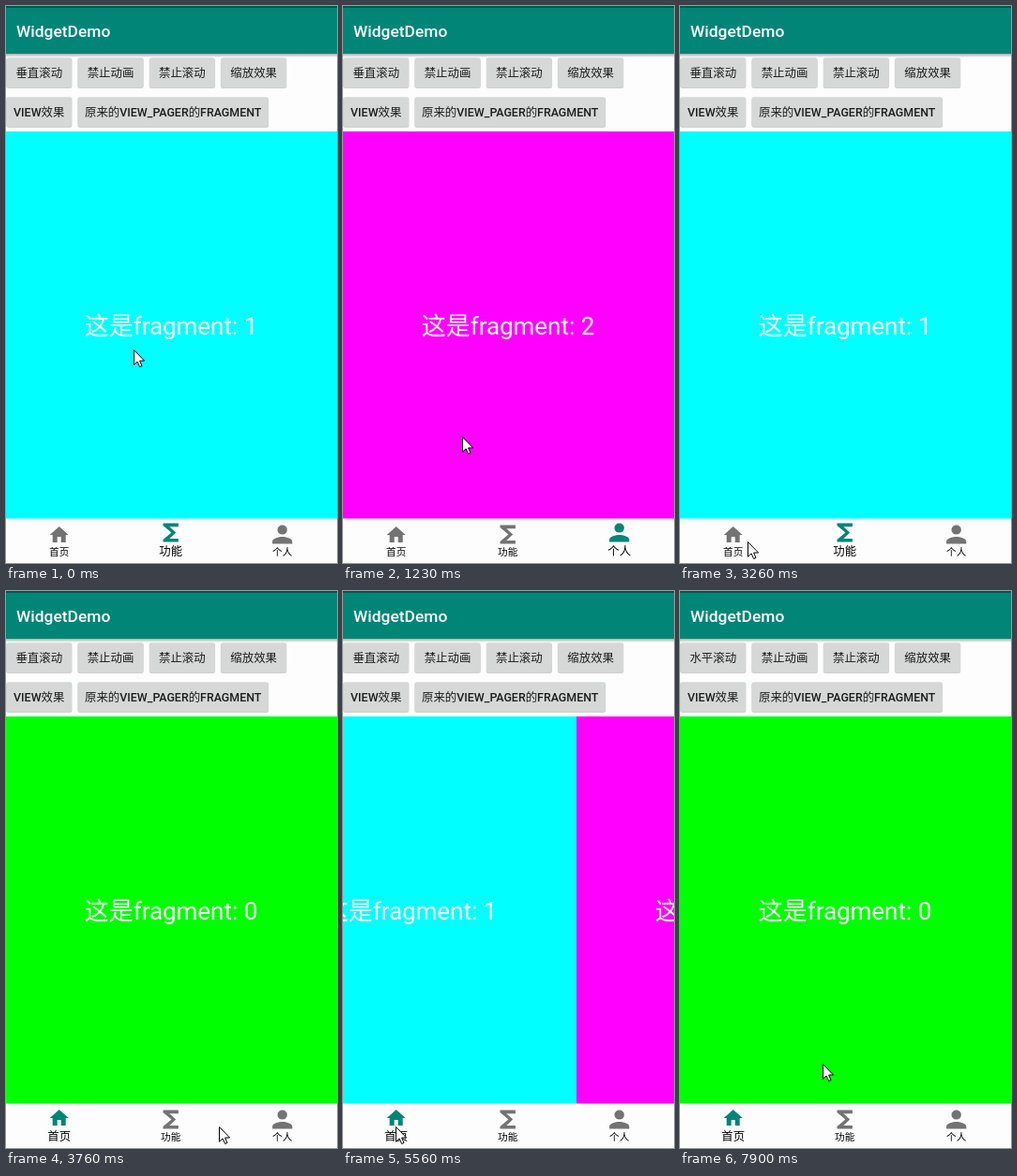
These frames come from a looping animation (353x595 px, 8 s). An HTML page:

```html
<!DOCTYPE html>
<html lang="zh-CN">
<head>
<meta charset="utf-8">
<title>WidgetDemo</title>
<style>
  html, body { margin: 0; width: 100%; height: 100%; overflow: hidden; background: #fdfdfd; }
  svg { display: block; width: 353px; height: 595px; }
  text { font-family: Roboto, "Noto Sans CJK SC", "Noto Sans CJK", sans-serif; }
  .mid { text-anchor: middle; }
  .btn { font-size: 12.43px; font-weight: 500; fill: #1c1c1c; }
  .page { font-size: 25.95px; fill: #fff; }
</style>
</head>
<body>
<svg id="stage" viewBox="0 0 353 595" xmlns="http://www.w3.org/2000/svg">
  <defs>
    <linearGradient id="shade" x2="0" y2="1">
      <stop offset="0" stop-color="#000" stop-opacity=".32"/>
      <stop offset="1" stop-color="#000" stop-opacity="0"/>
    </linearGradient>
  </defs>
  <rect width="353" height="595" fill="#fdfdfd"/>
  <rect y="51" width="353" height="4" fill="url(#shade)"/>
  <rect width="353" height="51" fill="#008577"/>
  <rect width="353" height="2" fill="#00574b"/>
  <text x="11" y="33" font-size="17.4" font-weight="500" fill="#fff">WidgetDemo</text>
  <g id="buttons"></g>
  <g id="pages"></g>
  <rect y="547.5" width="353" height="47.5" fill="#fdfdfd"/>
  <g id="tabs"></g>
  <path id="cursor" d="M.5 .5V16.3L4.1 12.9 6.6 18.5 9 17.5 6.6 12H11.6Z" fill="#fff" stroke="#000" stroke-linejoin="round"/>
</svg>
<script>
const LOOP = 8000, W = 353, TAB_LEAD = 38;
const $ = id => document.getElementById(id);

function add(parent, tag, attrs, text) {
  const el = document.createElementNS('http://www.w3.org/2000/svg', tag);
  for (const k in attrs) el.setAttribute(k, attrs[k]);
  if (text) el.textContent = text;
  parent.appendChild(el);
  return el;
}

// The screen refreshes in bursts: start, interval (ms), count
const bursts = [
  [0, 150, 1], [150, 133, 7], [1230, 140, 7], [2340, 130, 7], [3400, 120, 6],
  [4330, 133, 7], [5560, 144, 6], [6560, 134, 6], [7630, 135, 3]
];

// Pointer legs: start, end (ms), then the place reached
const home = [136, 367];
const legs = [
  [0, 410, 262, 366],
  [410, 810, 116, 356],
  [1100, 1230, 127, 460],
  [1230, 2070, 174, 572],
  [2600, 3200, 56, 572],
  [3400, 3890, 289, 572],
  [4870, 5160, 56, 572],
  [5700, 6280, 175, 4],
  [6560, 7230, 42, 76],
  [7630, 7900, 152, 505]
];

// Page scrolls: start (ms), from, to
const scrolls = [[700, 1.33, 2], [2378, 2, 1], [3370, 1, 0], [4620, 0, 2], [5535, 2, 0]];
const DRAG = { start: 410, x: 262 };
const CLICK = 7630, RELEASE = 7765;

const lastBefore = (list, t) => list.filter(k => k[0] <= t).pop();
const progress = (t, start, length) => Math.max(0, Math.min(1, (t - start) / length));

function refresh(t) {
  const [start, step, count] = lastBefore(bursts, t);
  return start + step * Math.min(count - 1, Math.floor((t - start) / step));
}

function pointer(t) {
  let [x, y] = home;
  for (const [start, end, toX, toY] of legs) {
    const u = progress(t, start, end - start);
    x += (toX - x) * u;
    y += (toY - y) * u;
  }
  return [x, y];
}

// Each page adds 100 ms; the scroll decelerates by a fifth power.
function scrollPos(t, x) {
  const s = lastBefore(scrolls, t);
  if (!s) return t > DRAG.start ? 1 + (DRAG.x - x) / W : 1;
  const [start, from, to] = s;
  const u = progress(t, start, 100 * (1 + Math.abs(to - from)));
  return from + (to - from) * (1 - (1 - u) ** 5);
}

function button(x, y, w, label) {
  const g = add($('buttons'), 'g', {});
  add(g, 'rect', { x: x - .5, y: y - .3, width: w + 1, height: 32.6, rx: 2.5, fill: '#000', opacity: .1 });
  add(g, 'rect', { x, y: y + .5, width: w, height: 31.7, rx: 2, fill: '#000', opacity: .12 });
  const face = add(g, 'rect', { x, y, width: w, height: 31.4, rx: 2, fill: '#d6d7d7' });
  const text = add(g, 'text', { x: x + w / 2, y: y + 20.7, class: 'btn mid' }, label);
  return { face, text };
}

const [toggle] = ['垂直滚动', '禁止动画', '禁止滚动', '缩放效果']
  .map((label, i) => button(.4 + 76.3 * i, 55.6, 69.7, label));
button(.4, 97.6, 69.7, 'VIEW效果');
button(76.7, 97.6, 203, '原来的VIEW_PAGER的FRAGMENT');

const pages = ['#0f0', '#0ff', '#f0f'].map((fill, i) => {
  const g = add($('pages'), 'g', {});
  add(g, 'rect', { y: 134, width: W, height: 414, fill });
  add(g, 'text', { x: 176, y: 350.7, class: 'page mid' }, '这是fragment: ' + i);
  return g;
});

// Icons are centred on 0,0.
const icons = [
  ['首页', 'M-2 8.5V2.5H2V8.5H7V.5H10L0 -8.5-10 .5H-7V8.5Z'],
  ['功能', 'M8.2-10H-8.2V-7.5L.7 0-8.2 7.5V10H8.2V6.3H-1.4L5.5 0-1.4-6.3H8.2Z'],
  ['个人', 'M0 0A5.2 5 0 0 0 0-10 5.2 5 0 0 0 0 0ZM0 2.5C-3.6 2.5-10.6 4.2-10.6 7.5V10H10.6V7.5C10.6 4.2 3.6 2.5 0 2.5Z']
];
const tabs = icons.map(([label, d], i) => {
  const x = 56.7 + 119 * i;
  return {
    x,
    icon: add($('tabs'), 'path', { d }),
    text: add($('tabs'), 'text', { x, class: 'mid' }, label)
  };
});

function render(time) {
  const t = refresh(time);
  const [x, y] = pointer(t).map(Math.round);
  $('cursor').setAttribute('transform', `translate(${x} ${y})`);

  const pos = scrollPos(t, x);
  pages.forEach((g, i) => g.setAttribute('transform', `translate(${Math.round((i - pos) * W)} 0)`));

  const chosen = lastBefore(scrolls, t + TAB_LEAD);
  const active = chosen ? chosen[2] : 1;
  tabs.forEach((tab, i) => {
    const on = i === active;
    tab.icon.setAttribute('transform', `translate(${tab.x} ${on ? 562.6 : 564.6})`);
    tab.icon.setAttribute('fill', on ? '#008577' : '#737373');
    tab.text.setAttribute('y', on ? 587 : 587.4);
    tab.text.setAttribute('font-size', on ? 12.4 : 10.6);
  });

  toggle.text.textContent = t >= CLICK ? '水平滚动' : '垂直滚动';
  toggle.face.setAttribute('fill', t >= CLICK && t < RELEASE ? '#c4c5c5' : '#d6d7d7');
}

const began = performance.now();
function loop() {
  render((performance.now() - began) % LOOP);
  requestAnimationFrame(loop);
}
loop();
</script>
</body>
</html>
```
